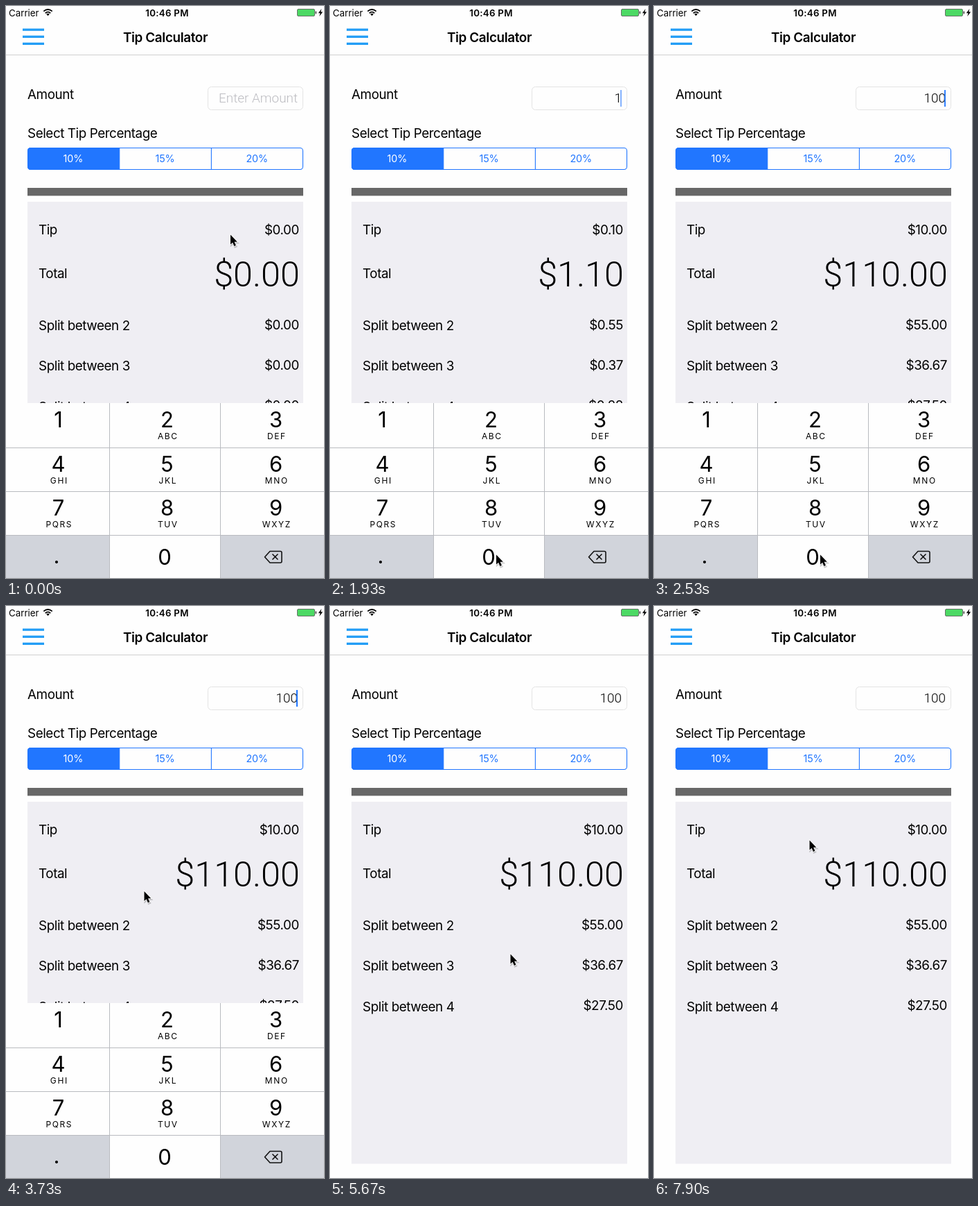
Write an HTML page that moves like this. It is 459 px wide and 824 px high and loops after 8000 ms.

```html
<!DOCTYPE html>
<html lang="en">
<head>
<meta charset="utf-8">
<title>Tip Calculator</title>
<style>
  html, body { margin: 0; width: 100%; height: 100%; overflow: hidden; background: #fefefe; }
  svg { display: block; width: 459px; height: 824px; }
  text { font: 18.85px Inter, sans-serif; letter-spacing: -.43px; white-space: pre; }
  .right { text-anchor: end; }
  .mid { text-anchor: middle; }
  .title { font-weight: 600; letter-spacing: -.36px; }
  .status { font-size: 13.3px; letter-spacing: 0; }
  .clock { font-size: 13.3px; font-weight: 600; letter-spacing: .3px; }
  .segment { font-size: 14.4px; letter-spacing: -.2px; fill: #2176ff; }
  .selected { fill: #fff; }
  .light { font: 300 18.9px Roboto, sans-serif; letter-spacing: 0; }
  .total { font: 300 50.4px Roboto, sans-serif; letter-spacing: 0; }
  .digit { font-size: 31px; letter-spacing: 0; }
  .letters { font-size: 12px; letter-spacing: 1.6px; }
</style>
</head>
<body>
<svg viewBox="0 0 459 824" id="stage"></svg>
<script>
const TICK = 149.2, LOOP = 8000;
const LEFT = 31, WIDTH = 398;
const KEYBOARD_TOP = 572, KEYBOARD_HEIGHT = 252, KEY_HEIGHT = 63;
const BLUE = '#2176ff', GREY_KEY = '#d1d4db', WHITE = '#fefefe';

const text = (x, y, content, cls = '', extra = '') =>
  `<text x="${x}" y="${y}" class="${cls}" ${extra}>${content}</text>`;
const rect = (x, y, w, h, fill, extra = '') =>
  `<rect x="${x}" y="${y}" width="${w}" height="${h}" fill="${fill}" ${extra}/>`;
const line = (d, stroke, width = 1) =>
  `<path d="${d}" fill="none" stroke="${stroke}" stroke-width="${width}" stroke-linejoin="round"/>`;
const repeat = (count, draw) => Array.from({ length: count }, (_, i) => draw(i)).join('');

function header() {
  return text(4, 14.5, 'Carrier', 'status') +
    line('M54.3 7.6Q60.5 2.4 66.7 7.6M56.8 10.2Q60.5 7 64.2 10.2', '#000', 1.8) +
    '<path d="M58.2 11.6Q60.5 9.8 62.8 11.6L60.5 14.2Z"/>' +
    text(232.5, 14.5, '10:46 PM', 'clock mid') +
    rect(420.5, 4.5, 25, 10, '#4cd964', 'rx="1.5" stroke="#555" stroke-width=".8"') +
    rect(446.6, 7.5, 1.5, 4, '#444', 'rx=".7"') +
    '<path d="M455.5 4L450.8 10.2H453.6L452.2 15L457.2 8.6H454.3Z"/>' +
    repeat(3, i => rect(24, 32.5 + i * 10.1, 31, 3.3, '#229df6')) +
    text(230, 52, 'Tip Calculator', 'title mid') +
    rect(0, 70, 459, 1, '#d0d0d0');
}

function segments() {
  const step = WIDTH / 3;
  return '<clipPath id="rounded">' + rect(LEFT, 204, WIDTH, 32, '#000', 'rx="4.5"') + '</clipPath>' +
    rect(LEFT, 204, step, 32, BLUE, 'clip-path="url(#rounded)"') +
    rect(LEFT + .5, 204.5, WIDTH - 1, 31, 'none', `rx="4" stroke="${BLUE}" stroke-width="1.1"`) +
    repeat(2, i => rect(LEFT - .5 + step * (i + 1), 204, 1.1, 32, BLUE)) +
    repeat(3, i => text(LEFT - .5 + step * (i + .5), 225, `${10 + i * 5}%`,
      i ? 'segment mid' : 'segment mid selected'));
}

function form() {
  return text(LEFT, 134, 'Amount') +
    rect(291.5, 116.5, 137, 33, WHITE, 'rx="5" stroke="#e4e4e4"') +
    text(421, 139, '', 'light right', 'id="amount"') +
    rect(419, 121, 2, 24, BLUE, 'id="caret"') +
    text(LEFT, 190, 'Select Tip Percentage') + segments() +
    rect(LEFT, 262, WIDTH, 11.4, '#676767');
}

function results() {
  return rect(LEFT, 282, WIDTH, 521.5, '#efeef3') +
    text(47, 329, 'Tip') + text(423, 329, '', 'right', 'id="tip"') +
    text(47, 392, 'Total') + text(424, 404, '', 'total right', 'id="total"') +
    repeat(3, i => text(47, 466.5 + i * 58.5, `Split between ${i + 2}`) +
      text(423, 465.5 + i * 58, '', 'right', `id="split${i + 2}"`));
}

function keyboard() {
  const lettering = ['', 'ABC', 'DEF', 'GHI', 'JKL', 'MNO', 'PQRS', 'TUV', 'WXYZ'];
  const bottomRow = 762;
  const keys = repeat(9, i => {
    const x = 75.5 + i % 3 * 157, y = 607 + Math.floor(i / 3) * 63.5;
    return text(x, y, i + 1, 'digit mid') + text(x + 1.3, y + 17, lettering[i], 'letters mid');
  });
  return rect(0, KEYBOARD_TOP, 459, KEYBOARD_HEIGHT, WHITE) +
    rect(0, bottomRow, 150, KEY_HEIGHT, GREY_KEY) +
    rect(309, bottomRow, 150, KEY_HEIGHT, GREY_KEY) +
    rect(0, KEYBOARD_TOP, 150, KEY_HEIGHT, GREY_KEY, 'id="press1"') +
    rect(150, bottomRow, 159, KEY_HEIGHT, GREY_KEY, 'id="press0"') +
    repeat(2, i => rect(149 + i * 160, KEYBOARD_TOP, 1, KEYBOARD_HEIGHT, '#b9bbc0')) +
    repeat(3, i => rect(0, 636 + i * KEY_HEIGHT, 459, 1, '#b9bbc0')) +
    keys + text(229, 805, '0', 'digit mid') + text(73, 803, '.', 'digit mid') +
    line('M381 785.5H396a2 2 0 0 1 2 2V800a2 2 0 0 1-2 2H381L373.5 793.7Z' +
      'm3.5 4l8 8m0-8l-8 8', '#111', 1.6);
}

function cursor() {
  const arrow = 'M0 0V14L3.1 11.2 5.4 16.4 7.9 15.3 5.6 10.2H9.8Z';
  return `<path d="${arrow}" transform="translate(.8 1.6)" opacity=".2" stroke="#000" stroke-width="2"/>` +
    `<path d="${arrow}" stroke="#fff" stroke-width="1.6" paint-order="stroke"/>`;
}

document.getElementById('stage').innerHTML =
  rect(0, 0, 459, 824, WHITE) + header() + form() + results() +
  `<g id="keyboard">${keyboard()}</g><g id="cursor">${cursor()}</g>`;

const el = id => document.getElementById(id);
const clamp = v => Math.min(1, Math.max(0, v));
const smooth = p => p * p * (3 - 2 * p);
const money = value => '$' + value.toFixed(2);

// Pointer gestures in ticks; it rests between them.
const START = { x: 324, y: 330 };
const MOVES = [
  { from: 0, to: 3, x: 372, y: 104 },
  { from: 3, to: 7, x: 131, y: 662 },
  { from: 7, to: 8, x: 122.5, y: 615 },
  { from: 10, to: 13, x: 240, y: 791 },
  { from: 19, to: 21, x: 164, y: 443 },
  { from: 22, to: 28, x: 235, y: 380 },
  { from: 29, to: 33, x: 245, y: 481 },
  { from: 37, to: 38, x: 260.5, y: 502 },
  { from: 38, to: 42, x: 424, y: 442 },
  { from: 42, to: 45, x: 351, y: 605 },
  { from: 46, to: 49, x: 324, y: 472 },
  { from: 51, to: 53, x: 224.5, y: 338 }
];
const pointerAt = tick => MOVES.reduce((at, move) => {
  const p = smooth(clamp((tick - move.from) / (move.to - move.from)));
  return { x: at.x + (move.x - at.x) * p, y: at.y + (move.y - at.y) * p };
}, START);

const TYPED = '100', KEYSTROKES = [10, 15, 17];
const FOCUS = 2.5, BLINK = 6.5, DISMISS = 34;

// The blink restarts at every keystroke.
const caretOpacity = sinceKey =>
  clamp(.5 + 2 * Math.cos((sinceKey - 1.4) / BLINK * 2 * Math.PI));

function render(time) {
  const tick = Math.floor((time + 10) / TICK);
  const done = KEYSTROKES.filter(k => k <= tick);
  const amount = TYPED.slice(0, done.length);
  const pressed = KEYSTROKES.includes(tick + 1) ? TYPED[done.length] : '';
  const total = amount * 1.1;

  el('amount').textContent = amount || 'Enter Amount';
  el('amount').setAttribute('fill', amount ? '#000' : '#bcbcc1');
  el('tip').textContent = money(amount * .1);
  el('total').textContent = money(total);
  for (const people of [2, 3, 4]) el('split' + people).textContent = money(total / people);
  for (const key of '01') el('press' + key).setAttribute('opacity', key === pressed ? 1 : 0);

  const slide = clamp((tick - DISMISS) / 2);
  el('caret').setAttribute('opacity', slide ? 0 : caretOpacity(tick - (done.pop() ?? FOCUS)));
  el('keyboard').setAttribute('transform', `translate(0 ${KEYBOARD_HEIGHT * slide * (2 - slide)})`);
  const { x, y } = pointerAt(tick);
  el('cursor').setAttribute('transform', `translate(${x} ${y - .5})`);
}

const began = performance.now();
function loop() {
  render((performance.now() - began) % LOOP);
  requestAnimationFrame(loop);
}
loop();
</script>
</body>
</html>
```
